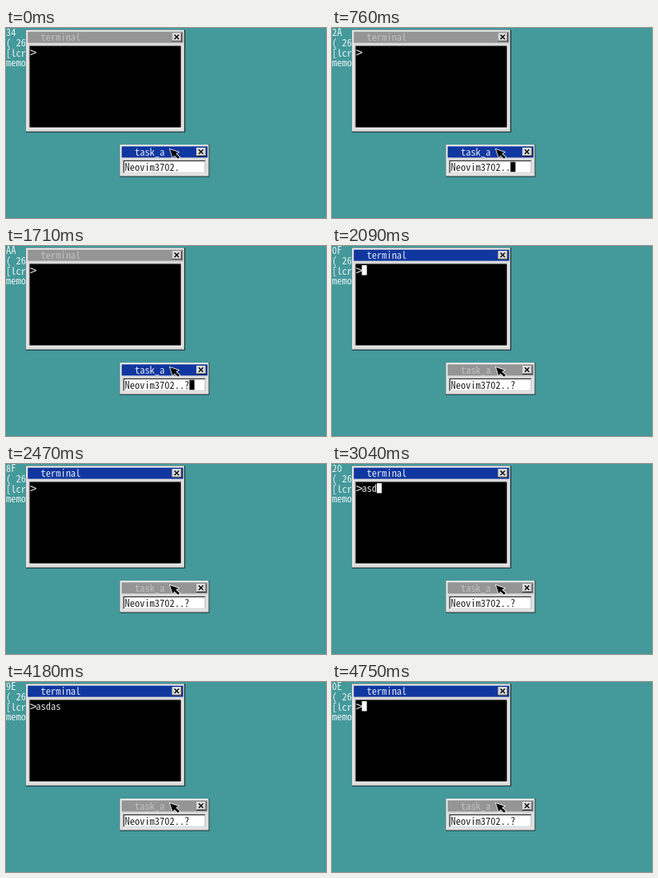
Recreate the animation shown at these times as an HTML page with a canvas. Size 400 by 238 pixels, loop 4.94 s.

```html
<!DOCTYPE html>
<html lang="en">
<head>
<meta charset="utf-8">
<title>Desktop</title>
<style>
  html, body { margin: 0; width: 100%; height: 100%; overflow: hidden; background: #44999b; }
  canvas { display: block; }
</style>
</head>
<body>
<canvas id="stage" width="400" height="238"></canvas>
<script>
const ctx = document.getElementById('stage').getContext('2d');
const SCALE = 0.777, LOOP = 4940;
const TEAL = '#44999b', LIGHT = '#dcdcdc', DIM = '#c6c6c6', GRAY = '#959595';
const BLUE = '#1037a0', BLACK = '#000', WHITE = '#fff';

// Each step lists only what changes: key code, task text, console text, caret, focus.
const steps = [
  [0,    { key: '34', task: 'Neovim3702.', term: '>', caret: false, focus: 'task' }],
  [190,  { key: 'B4', task: 'Neovim3702..' }],
  [760,  { key: '2A', caret: true }],
  [950,  { key: '35', task: 'Neovim3702..?', caret: false }],
  [1140, { key: 'AA' }],
  [1710, { caret: true }],
  [2090, { key: '0F', focus: 'term' }],
  [2280, { key: '8F', caret: false }],
  [2850, { caret: true }],
  [3040, { key: '20', term: '>asd' }],
  [3230, { key: 'A0', caret: false }],
  [3420, { key: '9E', term: '>asdas' }],
  [3800, { caret: true }],
  [4180, { caret: false }],
  [4370, { key: '0E', term: '>asda' }],
  [4560, { term: '>' }],
  [4750, { caret: true }]
];

function origin(x, y) {
  ctx.setTransform(SCALE, 0, 0, SCALE, x, y);
}

function rect(x, y, w, h, color) {
  ctx.fillStyle = color;
  ctx.fillRect(x, y, w, h);
}

// One character per 8 x 16 cell; the prompt sign fills its cell.
function text(str, x, y, color) {
  ctx.textAlign = 'center';
  ctx.fillStyle = color;
  ctx.globalAlpha = 0.88;
  [...str].forEach((c, i) => {
    const size = c === '>' ? 22 : 16;
    ctx.font = `${size}px "Noto Sans Mono CJK JP", "Noto Sans CJK JP", "Liberation Mono", monospace`;
    ctx.fillText(c, x + i * 8 + 4, y + 8 + size * 0.375);
  });
  ctx.globalAlpha = 1;
}

function closeButton(x, y) {
  rect(x, y, 16, 14, BLACK);
  rect(x, y, 15, 13, WHITE);
  rect(x + 1, y + 1, 14, 12, GRAY);
  rect(x + 1, y + 1, 13, 11, LIGHT);
  ctx.strokeStyle = BLACK;
  ctx.lineWidth = 1.8;
  ctx.beginPath();
  ctx.moveTo(x + 4, y + 3);
  ctx.lineTo(x + 11, y + 10);
  ctx.moveTo(x + 11, y + 3);
  ctx.lineTo(x + 4, y + 10);
  ctx.stroke();
}

function panel(w, h, title, active) {
  rect(0, 0, w, h, BLACK);
  rect(0, 0, w - 1, h - 1, LIGHT);
  rect(1, 1, w - 2, h - 2, GRAY);
  rect(1, 1, w - 3, h - 3, WHITE);
  rect(2, 2, w - 4, h - 4, LIGHT);
  rect(3, 3, w - 6, 18, active ? BLUE : GRAY);
  text(title, 24, 4, active ? WHITE : DIM);
  closeButton(w - 21, 5);
}

function field(w, h, str, paper, ink, caret) {
  rect(5, 25, w + 6, h + 6, WHITE);
  rect(5, 25, w + 5, h + 5, GRAY);
  rect(6, 26, w + 4, h + 4, LIGHT);
  rect(6, 26, w + 3, h + 3, BLACK);
  rect(7, 27, w + 2, h + 2, paper);
  text(str, 8, 28, ink);
  if (caret) rect(8 + str.length * 8, 28, 8, 16, ink);
}

function pointer() {
  const points = [[0, 0], [13.5, 4.5], [9.5, 7], [15.5, 12.5], [13, 15], [7, 9.5], [4.5, 13.5]];
  ctx.beginPath();
  points.forEach(([x, y]) => ctx.lineTo(x, y));
  ctx.closePath();
  ctx.strokeStyle = WHITE;
  ctx.lineWidth = 2;
  ctx.stroke();
  ctx.fillStyle = BLACK;
  ctx.fill();
}

function draw() {
  const now = performance.now() % LOOP;
  const state = Object.assign({}, ...steps.filter(([t]) => t <= now).map(([, change]) => change));
  const inTask = state.focus === 'task';

  origin(0, 0);
  rect(0, 0, 520, 310, TEAL);
  [state.key, '( 26', '[lcr', 'memo'].forEach((line, i) => text(line, 0, i * 16.6 - 1.5, WHITE));

  origin(24.9, 2.3);
  panel(256, 165, 'terminal', !inTask);
  field(240, 128, state.term, BLACK, WHITE, state.caret && !inTask);

  origin(142.3, 146);
  panel(144, 52, 'task_a', inTask);
  field(128, 16, state.task, WHITE, BLACK, state.caret && inTask);

  origin(205, 152);
  pointer();
  requestAnimationFrame(draw);
}
draw();
</script>
</body>
</html>
```
